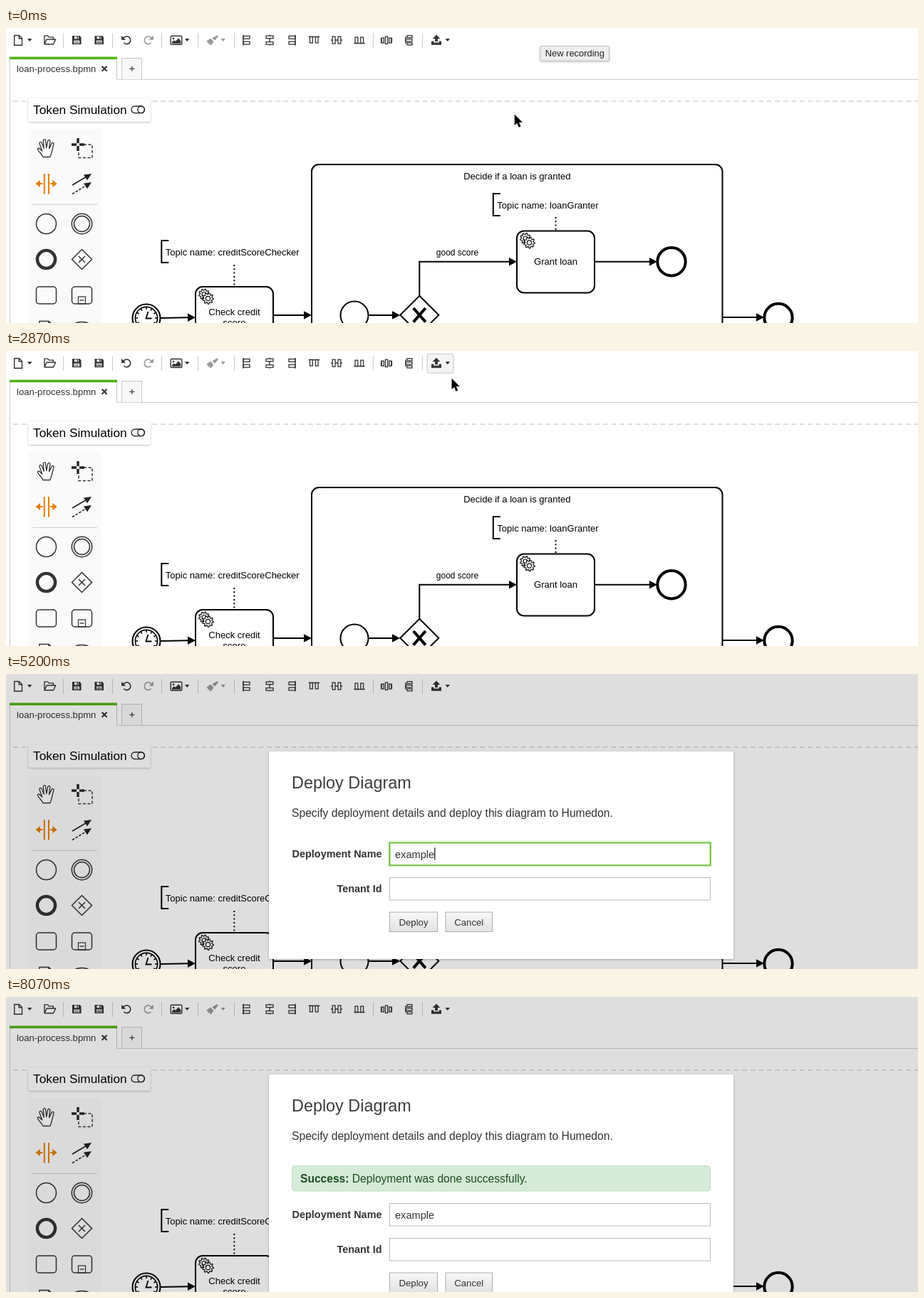
An HTML page for the animation above (8340 ms loop, 1280 by 415 pixels).

```html
<!DOCTYPE html>
<html lang="en">
<head>
<meta charset="utf-8">
<title>Deploy diagram</title>
<style>
  html, body { margin: 0; width: 100%; height: 100%; overflow: hidden; background: #fff; }
  svg { display: block; width: 100vw; height: 100vh; }
  text { font-family: "Liberation Sans", Arial, Helvetica, sans-serif; white-space: pre; }
</style>
</head>
<body>
<svg id="stage" viewBox="0 0 1280 415" xmlns="http://www.w3.org/2000/svg"></svg>
<script>
const LOOP = 8340;
const stage = document.getElementById('stage');

// Markup helpers
const path = (d, stroke = '#333', w = 1.5, fill = 'none', more = '') =>
  `<path d="${d}" fill="${fill}" stroke="${stroke}" stroke-width="${w}" ${more}/>`;
const solid = (d, fill = '#333') => path(d, 'none', 0, fill);
const box = (x, y, w, h, fill = 'none', stroke = 'none', sw = 1, r = 0, more = '') =>
  `<rect x="${x}" y="${y}" width="${w}" height="${h}" rx="${r}" fill="${fill}" stroke="${stroke}" stroke-width="${sw}" ${more}/>`;
const ring = (x, y, r, w = 1.5, stroke = '#333', fill = 'none') =>
  `<circle cx="${x}" cy="${y}" r="${r}" fill="${fill}" stroke="${stroke}" stroke-width="${w}"/>`;
const label = (s, x, y, size, fill = '#000', more = '') =>
  `<text x="${x}" y="${y}" font-size="${size}" fill="${fill}" ${more}>${s}</text>`;
const group = (id, body, more = '') => `<g id="${id}" ${more}>${body}</g>`;
const MID = 'text-anchor="middle"', BOLD = 'font-weight="bold"';

// Toolbar
const caret = (x, c = '#333') => solid(`M${x} 15h6.4l-3.2 4z`, c);
const disk = x => solid(`M${x} 11h10.5l2 2v10h-12.5z`) + box(x + 3, 11.8, 6, 3.4, '#fff') +
  box(x + 6.5, 12, 1.6, 2.8, '#333') + box(x + 2.4, 17.5, 7.7, 4.2, '#fff') +
  path(`M${x + 3.5} 19h5.5m-5.5 1.7h5.5`, '#333', .7);
const turn = (x, dir, c) => `<g transform="translate(${x} 17) scale(${dir} 1)">` +
  path('M-4.8-2.5A5.4 5.4 0 1 1-4.2 3.8', c, 1.6) + solid('M-7.4-6.2v6h6z', c) + '</g>';
const bars = (x, list, d) => list.map(b => box(x + b[0], b[1], b[2], b[3], '#fff', '#333', 1.3)).join('') + path(d, '#333', 1.4);
const uploadIcon = solid('M604 9.5l5.3 5.5h-3.4v4h-3.8v-4h-3.4z') +
  solid('M597 18.5h3.3v2h7.4v-2h3.3v5.2h-14z') + caret(616.6);

const toolbar = [
  path('M11.7 10.5h6.8l4 4v9.8h-10.8zM18.3 10.7v4h4', '#333', 1.4), caret(30),
  path('M54 22.8v-11.9h4.6l1.6 2h6.2v3M54 22.8l3.2-6.8h12.4l-3 6.8z', '#333', 1.4, 'none', 'stroke-linejoin="round"'),
  disk(93), disk(124.5), box(127, 19.8, 7.5, .8, '#333'),
  turn(169.5, 1, '#333'), turn(199.5, -1, '#999'),
  box(231.2, 11.3, 15.6, 12, '#fff', '#333', 1.4, 1), ring(235, 14.8, 1.4, 0, 'none', '#333'),
  solid('M233 21.8v-2l3-2.6 2 1.6 4-4.6 3.3 4v3.6z'), caret(251),
  solid('M281.5 18.5l5.5-4 4.5 4.8-4 5-2-1 1-2-2.5 1.3-1.2-1.2 1.6-2-2.2.5z', '#999'),
  path('M288.5 15l4 4.2', '#fff', 1), solid('M289.5 14.2l6.7-4.2 1.6 1.7-4.8 6z', '#999'), caret(301.5, '#999'),
  bars(333, [[0, 11.3, 9, 3.9], [0, 19.1, 9, 3.9]], 'M333 9.8v14.6'),
  bars(370, [[-5, 11, 10, 3.6], [-5, 19.6, 10, 3.6]], 'M370 14.6v5M370 9.4v1.6M370 23.2v1.4'),
  bars(406, [[-9, 11.3, 9, 3.9], [-9, 19.1, 9, 3.9]], 'M406 9.8v14.6'),
  bars(432.5, [[-6, 12.4, 3.8, 8.5], [1.8, 12.4, 3.8, 8.5]], 'M424.8 12.4h15.4'),
  bars(464, [[-5.8, 12, 3.8, 10], [2, 12, 3.8, 10]], 'M456 17h2.2m3.8 0h4m3.8 0h2.2'),
  bars(496, [[-6, 13, 3.8, 8.5], [1.8, 13, 3.8, 8.5]], 'M488.3 21.5h15.4'),
  bars(534, [[-6.8, 14, 3, 7], [-1.6, 12, 3.2, 10.4], [3.8, 14, 3, 7]], 'M526.6 14v7M541.4 14v7'),
  bars(566, [[-3, 10.6, 7, 3], [-5, 15.6, 9, 3.2], [-3, 20.8, 7, 3]], 'M561 12v10'),
  ...[80, 149, 218, 269, 320, 515, 584].map(x => path(`M${x}.5 7v21`, '#ccc', 1)),
  group('button', box(591, 4, 37, 27, '#f4f4f4', '#c4c4c4', 1, 3)),
  group('pressed', box(591, 4, 37, 27, '#bdbdbd', '#a4a4a4', 1, 3)),
  uploadIcon
].join('');

// Tabs and canvas frame
const tabs = [
  path('M5.5 415V41M155.5 41v31.3H1280M162.5 72V42.5h28V72', '#c8c8c8', 1),
  box(163, 43, 27, 29, '#f8f8f8'), box(5, 40.5, 151, 3.6, '#52b415'),
  label('loan-process.bpmn', 15, 62, 13.1, '#333'),
  path('M134.6 53.8l7 7m0-7l-7 7', '#333', 2),
  path('M173.3 57.3h7m-3.5-3.5v7', '#444', 1.3),
  path('M10 103H1280', '#ddd', 1.8, 'none', 'stroke-dasharray="6.5 5"'),
  box(31.5, 99, 171, 32.5, '#fff', 'none', 0, 2, 'filter="url(#soft)"'),
  label('Token Simulation', 38, 120.5, 17.3),
  box(176, 110, 18.5, 9.6, 'none', '#222', 1.3, 4.8), ring(189.6, 114.8, 4.8, 1.3, '#222')
].join('');

// Palette
const palette = [
  box(31.5, 142.5, 102, 280, '#fafafa'),
  path('M52 181.5c-2-4.500-5.500-6.500-7.500-10.500-.8-2 1.600-2.800 3-1l3.200 3-3.700-10.500c-.5-2.200 2.400-3 3.200-1l3 7.800-.9-10.800c0-2.300 3-2.500 3.300-.2l1.200 10.400 2-10c.6-2.200 3.300-1.600 3 .6l-1.300 10.300 3.600-7.200c1.100-1.900 3.500-.8 2.900 1.200-2 6-2.400 12-5.200 17.900z', '#333', 1.3, '#fff', 'stroke-linejoin="round"'),
  path('M101 155v7m0 4v7M92 164h7m4 0h7', '#222', 3.4),
  path('M109 164h12v18.500h-19v-10', '#333', 1.5, 'none', 'stroke-dasharray="4 2.600"'),
  path('M53.800 205v28.500M60 205v28.500M45 219h6.500M62 219h6', '#e67e00', 2),
  solid('M41.500 219l6.500-5v10zM71.800 219l-6.500-5v10z', '#e67e00'),
  path('M93 221l19-11.300', '#222', 1.6), solid('M120 205l-6 9.200-5-7.800z', '#222'),
  path('M93 233.500l19-11.600', '#222', 1.6, 'none', 'stroke-dasharray="3.500 2"'), solid('M120 217l-6 9.200-5-7.800z', '#222'),
  path('M37 248.300h91', '#ccc', 1),
  ring(56.5, 275.5, 14), ring(106.5, 275.5, 14.2), ring(106.5, 275.5, 11),
  ring(56.5, 325.500, 12.600, 4.400),
  path('M106.500 311.500l14 14-14 14-14-14zM102 321l9 9m0-9l-9 9', '#333', 1.5),
  box(42.500, 364, 28, 24, 'none', '#333', 1.5, 4), box(92.500, 364, 28, 24, 'none', '#333', 1.5, 4),
  box(101.500, 378, 10, 10, 'none', '#333', 1.2), path('M103.500 383h6', '#333', 1.3),
  path('M47 420v-7.500h13l6 6v5M60 412.500v6', '#333', 1.5),
  '<ellipse cx="106.500" cy="418" rx="11" ry="4.500" fill="none" stroke="#333" stroke-width="1.500"/>'
].join('');

// Diagram
const gear = (cx, cy, r) => {
  let d = '';
  for (let i = 0; i < 36; i++) {
    const a = i * Math.PI / 18, q = i % 4 < 2 ? r : r * .74;
    d += (i ? 'L' : 'M') + (cx + q * Math.cos(a)).toFixed(1) + ' ' + (cy + q * Math.sin(a)).toFixed(1);
  }
  return path(d + 'z', '#000', 1.1, '#fff') + ring(cx, cy, r * .4, 1.1, '#000');
};
const task = (x, y) => box(x, y, 109, 87, '#fff', '#000', 2, 10) + gear(x + 12, y + 10.5, 7.5) + gear(x + 17.500, y + 16.500, 7.8);
const flow = (d, x, y) => path(`${d}L${x - 9} ${y}`, '#000', 2) + solid(`M${x} ${y}l-11-5.800v11.600z`, '#000');
const note = (s, x, y) => path(`M${x + 10.5} ${y}h-10v31h10`, '#000', 2) + label(s, x + 6, y + 20.700, 13);
const dots = (x, y, end) => path(`M${x} ${y}V${end}`, '#000', 2, 'none', 'stroke-dasharray="2 3.300"');

let ticks = '';
for (let i = 0; i < 12; i++) ticks += `<path d="M197-15.500v3.500" transform="translate(0 408) rotate(${i * 30} 197 0)" stroke="#000" stroke-width="1.500"/>`;

const diagram = [
  box(429, 192, 576.500, 300, '#fff', '#000', 2, 10),
  label('Decide if a loan is granted', 717.300, 212.500, 13, '#000', MID),
  note('Topic name: loanGranter', 683.3, 233), dots(771.500, 266, 284),
  note('Topic name: creditScoreChecker', 217.8, 299), dots(320.300, 333, 363),
  task(717, 285.500), label('Grant loan', 771.500, 332.500, 13.050, '#000', MID),
  task(266, 364), label('Check credit', 320.500, 403.600, 13.050, '#000', MID), label('score', 320.500, 418.500, 13.050, '#000', MID),
  ring(197, 408, 19.500, 2, '#000', '#fff'), ring(197, 408, 15.600, 1.600, '#000'), ticks,
  path('M199.500 399l-3 9.500h8', '#000', 1.8),
  flow('M217 408', 266, 407.300), flow('M375 404', 429, 404),
  ring(489, 404, 19.500, 2, '#000', '#fff'), flow('M508.500 404', 553, 404),
  path('M580.300 376.800l27 27-27 27-27-27z', '#000', 2, '#fff'),
  path('M571.800 394l17 19.600m0-19.600l-17 19.600', '#000', 4),
  flow('M580.300 377V328.700', 717, 328.700), label('good score', 633.500, 320, 12, '#000', MID),
  flow('M826 328.700', 914, 328.700), ring(934, 328.700, 19.700, 4, '#000', '#fff'),
  flow('M1005.500 407', 1064, 407), ring(1084, 407.500, 19.700, 4, '#000', '#fff')
].join('');

// Menu, tooltip, dialog
const tip = group('tip', box(750, 25.500, 96.500, 20.500, '#eee', '#c4c4c4', 1, 1, 'filter="url(#soft)"') + label('New recording', 798.3, 40.400, 12.900, '#222', MID));
const menu = group('menu', box(594.500, 33.500, 214, 53, '#fff', '#c4c4c4', 1) + box(595, 34, 213, 26, '#ececec', 'none', 0, 0, 'id="row"') +
  label('Deploy Current Diagram', 600, 51.300, 14.300, '#444') + label('Configure Deployment Endpoint', 600, 77.300, 14.300, '#444'));

const button = (s, x, w, id) => box(x, 335, w, 27.500, 'url(#btn)', '#adadad', 1, 0, `id="${id}"`) +
  label(s, x + w / 2, 353.500, 13.200, '#333', MID);
const dialog = group('dialog', [
  box(0, 0, 1280, 415, '#000', 'none', 0, 0, 'opacity=".128"'),
  box(369, 109, 652, 292, '#fff', 'none', 0, 2, 'id="panel" filter="url(#soft)"'),
  label('Deploy Diagram', 401, 161, 23.400, '#3c3c3c'),
  label('Specify deployment details and deploy this diagram to Humedon.', 401, 201.300, 15.660, '#333'),
  group('success', box(401.500, 237.500, 587, 35.500, '#d5ead8', '#c0dfc2', 1, 4) +
    label(`<tspan ${BOLD}>Success:</tspan> Deployment was done successfully.`, 413, 261, 15.600, '#1d4b20')),
  group('form', [
    label('Deployment Name', 527.500, 258, 14.450, '#333', BOLD + ' text-anchor="end"'),
    label('Tenant Id', 527.500, 306.500, 14.450, '#333', BOLD + ' text-anchor="end"'),
    box(537, 235.500, 453, 35, 'none', '#d9efcb', 2, 2, 'id="glow"'),
    box(538.500, 237.500, 450, 31.500, '#fff', '#bbb', 1, 0, 'id="field"'),
    box(538.500, 286.500, 450, 31.500, '#fff', '#bbb'),
    label('', 546, 258.700, 14.600, '#333', 'id="typed"'), box(0, 244.500, 1.200, 17, '#000', 'none', 0, 0, 'id="caret"'),
    button('Deploy', 538.500, 67, 'deploy'), button('Cancel', 617, 65.500, 'cancel')
  ].join(''))
].join(''));

const pointer = group('pointer',
  group('arrow', path('M0 0v15.500l3.500-3.200 2.500 5.900 2.800-1.200-2.500-5.700h4.900z', '#fff', 1.200, '#000', 'paint-order="stroke"')) +
  group('ibeam', path('M-3-8q3 0 3 2.500v11q0 2.500-3 2.500M3-8q-3 0-3 2.500M3 8q-3 0-3-2.500M-2 1.500h4', '#222', 1.200)));

const shades = (id, a, b) => `<linearGradient id="${id}" x2="0" y2="1"><stop stop-color="${a}"/><stop offset="1" stop-color="${b}"/></linearGradient>`;
stage.innerHTML = `<defs>${shades('btn', '#f8f8f8', '#e2e2e2')}${shades('btnDown', '#a6a6a6', '#bcbcbc')}
  <filter id="soft" x="-10%" y="-20%" width="120%" height="150%"><feDropShadow dx="0" dy="1" stdDeviation="1.500" flood-opacity=".3"/></filter></defs>` +
  box(0, 0, 1280, 415, '#fff') + tabs + diagram + palette + toolbar + tip + menu + dialog + pointer;

// Motion
const $ = id => document.getElementById(id);
const clamp = v => Math.max(0, Math.min(1, v));
const ramp = (t, a, b) => clamp((t - a) / (b - a));
const ease = k => k * k * (3 - 2 * k);
const show = (id, v) => $(id).setAttribute('opacity', +v);
const set = (id, attrs) => { for (const k in attrs) $(id).setAttribute(k, attrs[k]); };

// start, end, destination
const moves = [[70, 670, 611, 15], [2470, 2730, 625.500, 38.500], [3070, 3470, 678, 253], [5530, 6200, 587.300, 346], [6600, 6930, 600, 440]];
const keys = [4000, 4400, 4600, 4730, 5000, 5070, 5200];

function pointerAt(t) {
  let x = 713.700, y = 121.500;
  for (const [a, b, tx, ty] of moves) {
    const k = ease(ramp(t, a, b));
    x += (tx - x) * k;
    y += (ty - y) * k;
  }
  return [x, y];
}

function draw(t) {
  const [x, y] = pointerAt(t);
  const open = t >= 3000, focus = t >= 3670 && t < 6330, done = t >= 6530;
  const shift = done ? 53 : 0;

  show('tip', 1 - ramp(t, 900, 1200));
  show('button', t < 3130 ? ramp(t, 1430, 1600) : 0);
  show('pressed', t >= 2070 && t < 2870);
  show('menu', t >= 2130 && t < 2870);
  show('row', y > 33);
  show('dialog', open);
  show('success', done);
  set('panel', { height: 292 + shift });
  set('form', { transform: `translate(0 ${shift})` });

  show('glow', focus);
  const edge = focus ? '#52b415' : t < 3670 ? '#f0401c' : '#bbb';
  set('field', { stroke: edge, 'stroke-width': focus ? 1.5 : t < 3670 ? 1.3 : 1 });
  $('typed').textContent = 'example'.slice(0, keys.filter(k => t >= k).length);
  show('caret', focus);
  set('caret', { x: 546 + $('typed').getComputedTextLength() });
  set('deploy', { fill: t >= 6330 && t < 6400 ? 'url(#btnDown)' : 'url(#btn)' });

  const over = top => y > top + shift && y < top + 32 + shift;
  const text = open && (over(237) || over(286));
  show('pointer', t < 4000 || t >= 5530);
  show('arrow', !text);
  show('ibeam', text);
  set('pointer', { transform: `translate(${x.toFixed(1)} ${y.toFixed(1)})` });
}

const start = performance.now();
function tick() {
  draw((performance.now() - start) % LOOP);
  requestAnimationFrame(tick);
}
tick();
</script>
</body>
</html>
```
